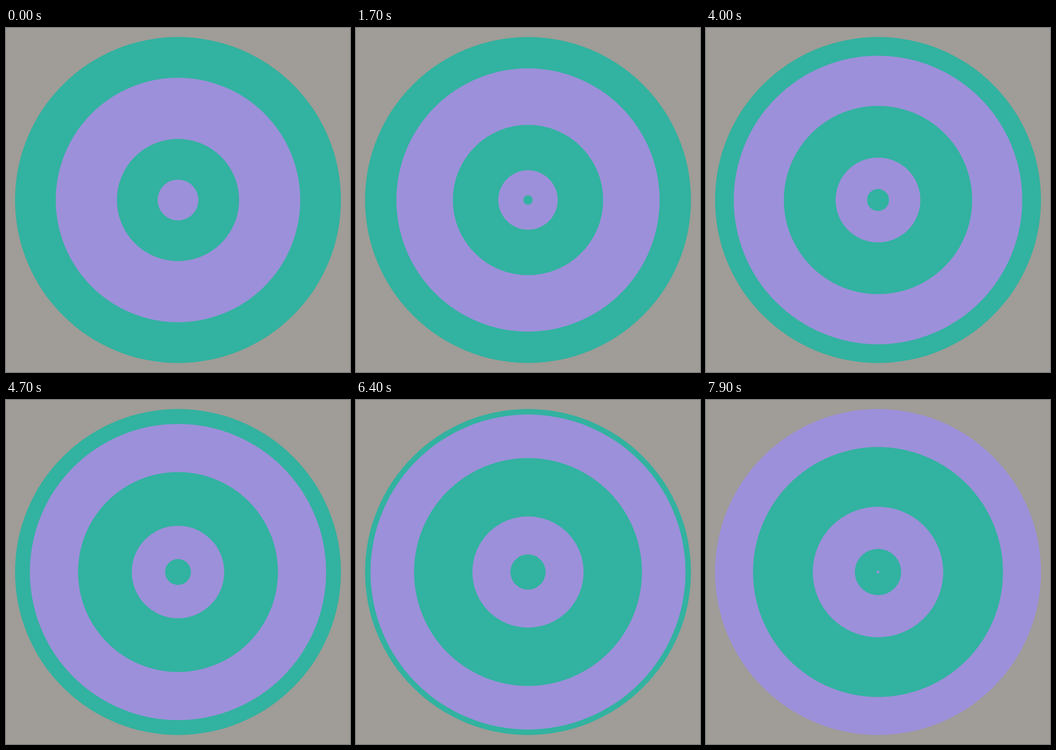
Animation of 748x748 px, one loop 8000 ms. Source, as an HTML page with a canvas:

```html
<!DOCTYPE html>
<html>
<head>
<meta charset="utf-8">
<style>
html, body { margin: 0; width: 100%; height: 100%; overflow: hidden; background: #a09c97; }
canvas { display: block; }
</style>
</head>
<body>
<canvas id="stage" width="748" height="748"></canvas>
<script>
const ctx = document.getElementById('stage').getContext('2d');
const COLORS = ['#32b2a0', '#9c90da'];
const LOOP = 8000, STEP = 100, STEPS_PER_STAGE = 74;
const RADIUS = 354.4;
const STOPS = [0, 1 / 8, 3 / 8, 6 / 8, 1].map(s => s * RADIUS);

function disc(r, color) {
  ctx.fillStyle = color;
  ctx.beginPath();
  ctx.arc(374, 374, r, 0, Math.PI * 2);
  ctx.fill();
}

function draw(now) {
  const step = Math.floor((now % LOOP) / STEP);
  const stage = Math.floor(step / STEPS_PER_STAGE);
  const p = step / STEPS_PER_STAGE - stage;

  ctx.clearRect(0, 0, 748, 748);
  disc(RADIUS, COLORS[stage % 2]);
  // Each ring grows from its stop to the next one; colours swap every stage.
  for (let i = 3; i >= 0; i--) {
    const r = STOPS[i] + (STOPS[i + 1] - STOPS[i]) * p;
    disc(r, COLORS[(i + stage) % 2]);
  }
}

const start = performance.now();
function tick() {
  draw(performance.now() - start);
  requestAnimationFrame(tick);
}
tick();
</script>
</body>
</html>
```
